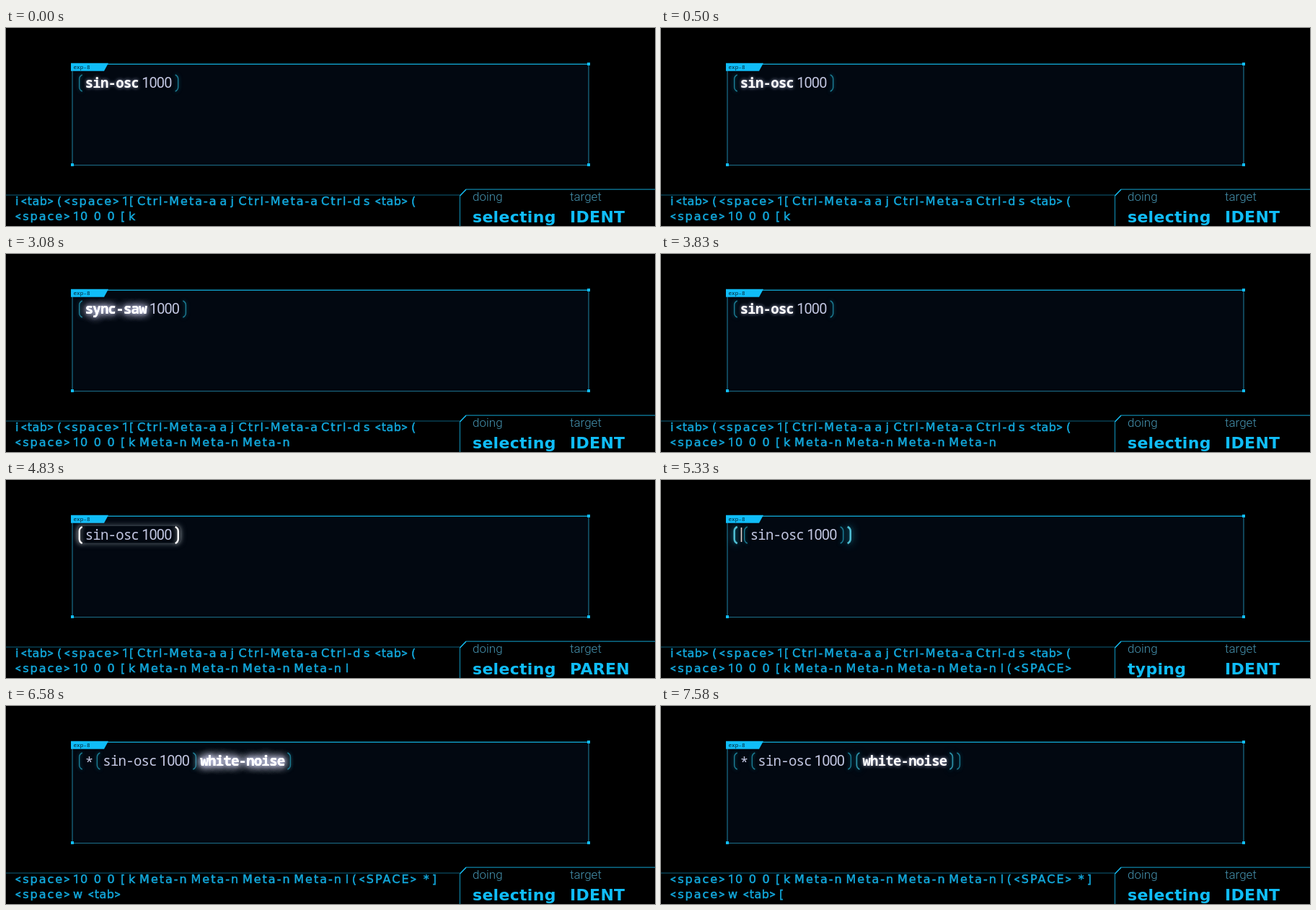
Animation of 900 by 275 pixels, one loop 8 s. Source, as an HTML page with a canvas:

```html
<!DOCTYPE html>
<html lang="en">
<head>
<meta charset="utf-8">
<title>Structured editing</title>
<style>
  html, body { margin: 0; width: 100%; height: 100%; overflow: hidden; background: #000; }
  canvas { display: block; }
</style>
</head>
<body>
<canvas id="stage" width="900" height="275"></canvas>
<script>
const ctx = document.getElementById('stage').getContext('2d');
const LOOP = 8000, PULSE = 280;
const CYAN = '#10bdf8', PANEL = '#020811';
const MONO = '"Noto Sans Mono", monospace', WIDE = '"DejaVu Sans", sans-serif', THIN = 'Roboto, sans-serif';

const history = 'i <tab> ( <space> 1 [ Ctrl-Meta-a a j Ctrl-Meta-a Ctrl-d s <tab> ( <space> 1 0 0 0 [ k'.split(' ');
const advance = {
  i: 8, '<tab>': 50, '(': 10, '<space>': 80, 1: 10, '[': 11, 'Ctrl-Meta-a': 114.5, a: 15, j: 11,
  'Ctrl-d': 59, s: 16, 0: 18.7, k: 15, 'Meta-n': 71.4, l: 9, '<SPACE>': 89, '*': 12, ']': 10, w: 21
};

// [time, key, expression, doing, target]; ! selected, # selected and fresh, + fresh, | caret
const steps = [
  [0, '', '( !sin-osc 1000 )', 'selecting', 'IDENT'],
  [2500, 'Meta-n', '( #saw 1000 )', 'selecting', 'IDENT'],
  [2667, 'Meta-n', '( #square 1000 )', 'selecting', 'IDENT'],
  [3000, 'Meta-n', '( #sync-saw 1000 )', 'selecting', 'IDENT'],
  [3417, 'Meta-n', '( #sin-osc 1000 )', 'selecting', 'IDENT'],
  [4830, 'l', '!( sin-osc 1000 !)', 'selecting', 'PAREN'],
  [5167, '(', '+( | ( sin-osc 1000 ) +)', 'typing', 'IDENT'],
  [5250, '<SPACE>', '+( | ( sin-osc 1000 ) +)', 'typing', 'IDENT'],
  [5580, '*', '( *| ( sin-osc 1000 ) )', 'typing', 'IDENT'],
  [5917, ']', '( * !( sin-osc 1000 !) )', 'selecting', 'PAREN'],
  [6080, '<space>', '( * ( sin-osc 1000 ) | )', 'typing', 'IDENT'],
  [6330, 'w', '( * ( sin-osc 1000 ) w| )', 'typing', 'IDENT'],
  [6580, '<tab>', '( * ( sin-osc 1000 ) #white-noise )', 'selecting', 'IDENT'],
  [7417, '[', '( * ( sin-osc 1000 ) +( !white-noise +) )', 'selecting', 'IDENT']
];

function text(s, x, y, font, color, spacing = 0, outline = 0) {
  ctx.font = font;
  ctx.letterSpacing = spacing + 'px';
  ctx.fillStyle = color;
  ctx.fillText(s, x, y);
  if (outline) {
    ctx.strokeStyle = color;
    ctx.lineWidth = outline;
    ctx.strokeText(s, x, y);
  }
  return ctx.measureText(s).width;
}

function glow(color, blur) {
  ctx.shadowColor = color;
  ctx.shadowBlur = blur;
}

function line(color, width, ...pts) {
  ctx.strokeStyle = color;
  ctx.lineWidth = width;
  ctx.beginPath();
  for (let i = 0; i < pts.length; i += 2) ctx.lineTo(pts[i], pts[i + 1]);
  ctx.stroke();
}

function drawPanel() {
  ctx.fillStyle = PANEL;
  ctx.fillRect(92, 50, 716, 140);
  line('#1c6f8c', 1.2, 92, 50, 92, 190.5, 808, 190.5, 808, 50);
  line('#0f97c0', 1.5, 92, 50.3, 808, 50.3);
  ctx.fillStyle = CYAN;
  for (const [x, y] of [[808, 50], [92, 190], [808, 190]]) ctx.fillRect(x - 2, y - 2, 4, 4);
  ctx.beginPath();
  ctx.moveTo(90, 48.7);
  ctx.lineTo(142, 48.7);
  ctx.lineTo(136, 59.7);
  ctx.lineTo(90, 59.7);
  ctx.fill();
  text('exp-8', 93.5, 56.5, '7.7px ' + MONO, '#022230');
}

function strokeParen(open, x, color, width) {
  const tip = open ? x + 6 : x, bow = open ? x + 2 : x + 4;
  ctx.strokeStyle = color;
  ctx.lineWidth = width;
  ctx.beginPath();
  ctx.moveTo(tip, 65);
  ctx.quadraticCurveTo(bow, 67, bow, 71);
  ctx.lineTo(bow, 82);
  ctx.quadraticCurveTo(bow, 86, tip, 88);
  ctx.stroke();
}

function drawParen(open, x, mark, pulse) {
  if (mark === '!') {
    glow('rgba(255,255,255,.7)', 6);
    strokeParen(open, x, '#fff', 2.4);
  } else {
    glow('#0b5468', 5);
    strokeParen(open, x, '#1b7c94', 1.4);
    if (mark === '+' && pulse > 0) {
      ctx.globalAlpha = Math.min(1, 2 * pulse);
      glow('#2aa5c0', 12);
      strokeParen(open, x, '#4fbdd2', 1.5 + 2 * pulse);
      ctx.globalAlpha = 1;
    }
  }
  glow('transparent', 0);
}

function drawWord(word, x, mark, pulse) {
  const digits = /^\d/.test(word), y = word === '*' ? 85 : 83;
  const spacing = digits ? -0.9 : -0.76;
  if (!mark) {
    text(word, x, y, digits ? '20px ' + THIN : '19px ' + MONO, '#c3c7e2', spacing);
    return;
  }
  const font = '600 19px ' + MONO;
  if (mark === '#' && pulse > 0) {
    ctx.globalAlpha = Math.min(1, pulse * 1.3);
    glow('#dfe0ff', 13);
    for (let i = 0; i < 3; i++) text(word, x, y, font, '#fff', spacing);
    ctx.globalAlpha = 1;
  }
  glow('rgba(200,205,240,.8)', 5);
  text(word, x, y, font, '#fff', spacing);
  glow('transparent', 0);
}

function drawCaret(x) {
  ctx.fillStyle = '#f0dcd8';
  ctx.fillRect(x, 66, 1.6, 20);
}

function layout(expr) {
  let x = 99.7;
  return expr.split(' ').map(token => {
    const mark = /^[!#+]/.test(token) ? token[0] : '';
    const caret = token.endsWith('|');
    const body = token.slice(mark.length).replace('|', '');
    const item = { mark, caret, body, x };
    x += /^[()]$/.test(body) ? 10 : body.length * 10.64 + 4;
    return item;
  });
}

function drawExpr(expr, pulse) {
  const items = layout(expr);
  const group = items.filter(o => o.mark === '!' && /^[()]$/.test(o.body));
  if (group.length) {
    glow('rgba(200,215,225,.5)', 9);
    ctx.fillStyle = PANEL;
    ctx.beginPath();
    ctx.roundRect(group[0].x, 64, group[1].x + 7 - group[0].x, 23.5, 5);
    ctx.fill();
    glow('transparent', 0);
  }
  for (const { mark, caret, body, x } of items) {
    if (/^[()]$/.test(body)) drawParen(body === '(', x, mark, pulse);
    else if (body) drawWord(body, x, mark, pulse);
    if (caret) drawCaret(x + body.length * 10.64 + 1);
  }
}

function drawKey(key, x, y) {
  for (const part of key.split(/([<>1])/)) {
    if (!part) continue;
    const font = /[<>1]/.test(part) ? THIN : WIDE;
    x += text(part, x, y, '16px ' + font, '#12a8dc', key === '<tab>' ? 0.5 : 2, 0.5);
  }
}

function drawLog(keys) {
  const lines = [[]];
  let x = 13;
  for (const key of keys) {
    if (x + advance[key] > 612) {
      lines.push([]);
      x = 13;
    }
    lines.at(-1).push([key, x]);
    x += advance[key];
  }
  lines.slice(-2).forEach((row, i) => {
    for (const [key, left] of row) drawKey(key, left, 245.5 + 21 * i);
  });
}

function drawStatus(doing, target) {
  line('#0c5f7c', 1.2, 0, 232, 629.5, 232);
  line('#0f84a8', 1.2, 629.5, 275, 629.5, 233, 638, 224.2, 900, 224.2);
  line('#15b4e6', 1.4, 629.5, 233, 638, 224.2);
  [['doing', doing, 647], ['target', target, 782]].forEach(([label, value, x]) => {
    text(label, x, 240, '300 17px ' + THIN, '#4593b0');
    text(value, x, 270, 'bold 22px ' + WIDE, CYAN, 0.3);
  });
}

function draw(now) {
  const t = now % LOOP;
  const at = steps.findLastIndex(s => s[0] <= t);
  const [start, , expr, doing, target] = steps[at];
  const pulse = Math.max(0, 1 - (t - start) / PULSE) ** 2;
  ctx.fillStyle = '#000';
  ctx.fillRect(0, 0, 900, 275);
  drawPanel();
  drawExpr(expr, pulse);
  drawStatus(doing, target);
  drawLog(history.concat(steps.slice(1, at + 1).map(s => s[1])));
}

let begin;
function frame(now) {
  begin ??= now;
  draw(Math.max(0, now - begin));
  requestAnimationFrame(frame);
}
requestAnimationFrame(frame);
</script>
</body>
</html>
```
